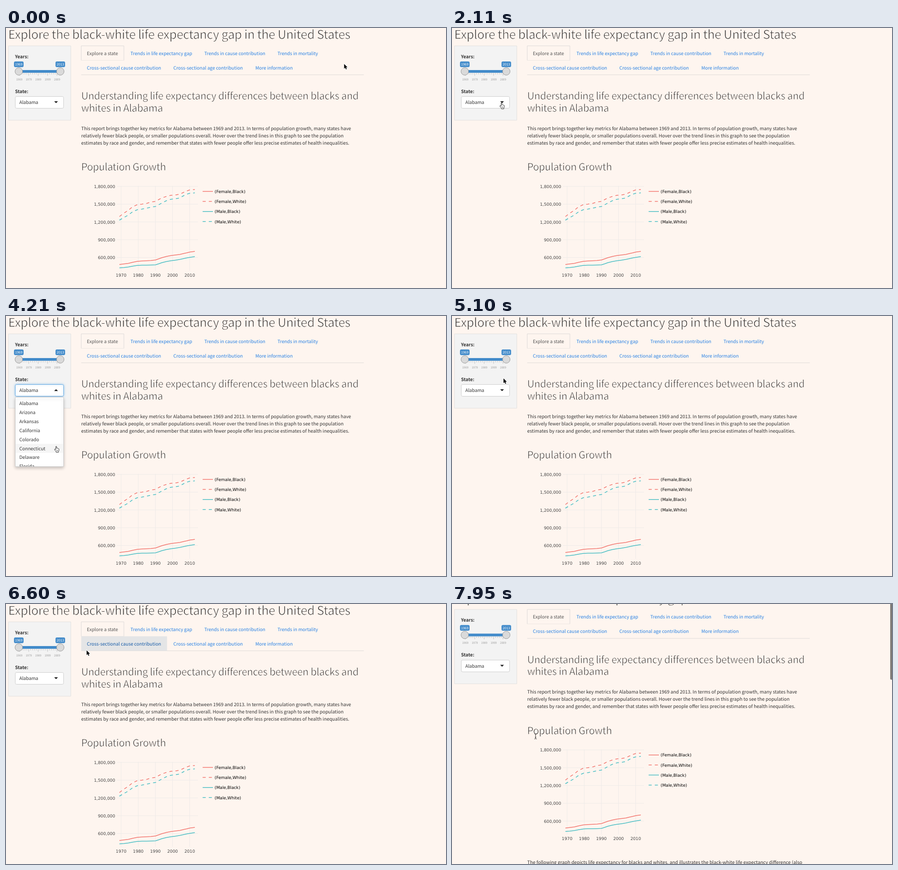
An HTML page with a canvas that plays this animation: 974x575 px, repeating every 8000 ms.

```html
<!DOCTYPE html>
<html lang="en">
<head>
<meta charset="utf-8">
<title>Life expectancy gap</title>
<style>
  html, body { margin: 0; width: 100%; height: 100%; overflow: hidden; background: #fef5ef; }
  canvas { display: block; }
</style>
</head>
<body>
<canvas id="stage" width="974" height="575"></canvas>
<script>
const ctx = document.getElementById('stage').getContext('2d');
const LOOP = 8000;
const BG = '#fef5ef', INK = '#333', LINK = '#2780e3', CORAL = '#f3746d', TEAL = '#45bdc3';
const SANS = '"Noto Sans CJK JP", "Noto Sans CJK SC", "Noto Sans CJK", "Open Sans", sans-serif';
const CHART_FONT = '9.2px "DejaVu Sans", sans-serif';
const LABEL = 10.2, PROSE = 10.3, TITLE = 26.73, SECTION = 21.92;

const OPEN = 2410, CLOSE = 4950, SCROLL = 7950;

// Pointer steps: time, x, y, shape. The picture holds between steps.
const pointer = [
  [0, 748.5, 79.5, arrow], [600, 690, 88, arrow], [750, 480, 112, arrow],
  [900, 260, 140, arrow], [1060, 140, 156, arrow], [1210, 113, 159, hand],
  [1960, 109, 162, hand], [2110, 105.5, 165, hand],
  [3760, 106, 190, hand], [3910, 107, 232, hand], [4060, 107, 272, hand],
  [4210, 107, 287.5, hand], [4360, 107.5, 268, hand], [4510, 108.5, 224, hand],
  [4660, 110, 178, hand], [4800, 112.5, 126, arrow], [4950, 113.5, 132, arrow],
  [5100, 114, 138, arrow], [5400, 104, 130, arrow], [5550, 82, 114, arrow],
  [5700, 60, 99, arrow], [5850, 46, 95, arrow], [6000, 43, 100, arrow],
  [6150, 44, 107, arrow], [6300, 46, 112, arrow], [6450, 105, 110, arrow],
  [6600, 178.5, 102.5, arrow], [6750, 186, 107, arrow], [6900, 191, 112, arrow],
  [7200, 191, 152, beam], [7350, 190, 212, beam], [7500, 187, 266, beam], [7650, 185, 292.5, beam]
];

// Chart curves share these x positions.
const xs = [251, 261, 271, 280, 291, 301, 311, 321, 331, 338, 345, 355, 365, 375, 385, 392, 400, 407, 418];
const series = [
  { name: '(Female,Black)', color: CORAL, dash: [],
    ys: [523, 521.8, 520.5, 518.2, 516, 515.2, 514.8, 514.2, 513, 510.5, 508, 505.2, 503.3, 502, 500.8, 499, 497.3, 495.6, 494] },
  { name: '(Female,White)', color: CORAL, dash: [6.8, 6.8],
    ys: [417, 409.5, 403, 395.5, 390.5, 389.5, 388, 384.8, 383.5, 379.5, 375.8, 372.5, 370, 369.2, 367.5, 364, 360.5, 358, 357.2] },
  { name: '(Male,Black)', color: TEAL, dash: [],
    ys: [530.5, 529.7, 528.6, 526.8, 525, 524.6, 524.4, 524.2, 523.8, 521.5, 519, 516.6, 514.8, 513.4, 511.8, 510.2, 508.6, 507.2, 505.6] },
  { name: '(Male,White)', color: TEAL, dash: [6.8, 6.8],
    ys: [425, 419, 413.5, 406.5, 401.7, 400.5, 398.5, 396.2, 394.7, 391, 387, 382, 378.8, 377.6, 375.8, 371.5, 367.5, 365.5, 364.6] }
];
const states = ['Alabama', 'Arizona', 'Arkansas', 'California', 'Colorado', 'Connecticut', 'Delaware', 'Florida'];

function text(str, x, y, color = INK, size = LABEL, weight = 400, align = 'left') {
  ctx.font = `${weight} ${size}px ${SANS}`;
  ctx.fillStyle = color;
  ctx.textAlign = align;
  ctx.fillText(str, x, y);
}

function hasLight() {
  const width = weight => {
    ctx.font = `${weight} 100px ${SANS}`;
    return ctx.measureText('Understanding').width;
  };
  return Math.abs(width(300) - width(400)) > 1;
}

// Without a light face, the regular one is set tighter and thinned at its edges.
function heading(str, x, y, size) {
  if (hasLight()) {
    text(str, x, y, INK, size, 300);
    return;
  }
  ctx.save();
  ctx.letterSpacing = `${-0.0155 * size}px`;
  text(str, x, y, INK, size);
  ctx.strokeStyle = BG;
  ctx.lineWidth = 0.035 * size;
  ctx.lineJoin = 'round';
  ctx.strokeText(str, x, y);
  ctx.restore();
}

function box(x, y, w, h, r, fill, stroke) {
  ctx.beginPath();
  ctx.roundRect(x, y, w, h, r);
  if (fill) { ctx.fillStyle = fill; ctx.fill(); }
  if (stroke) { ctx.strokeStyle = stroke; ctx.lineWidth = 1; ctx.stroke(); }
}

function line(points, color, width = 1, dash = []) {
  ctx.beginPath();
  points.forEach(([x, y]) => ctx.lineTo(x, y));
  ctx.strokeStyle = color;
  ctx.lineWidth = width;
  ctx.setLineDash(dash);
  ctx.stroke();
  ctx.setLineDash([]);
}

function shadowed(color, blur, dy, draw) {
  ctx.save();
  ctx.shadowColor = color;
  ctx.shadowBlur = blur;
  ctx.shadowOffsetY = dy;
  draw();
  ctx.restore();
}

function drawSlider() {
  text('Years:', 20, 66.6, INK, LABEL, 700);
  for (let i = 0; i <= 22; i++) {
    const x = 29.5 + i * 4.17;
    line([[x, 99.5], [x, i % 5 ? 102.5 : 105.5]], '#aaa', 0.75);
  }
  for (let i = 0; i < 5; i++) text(1969 + i * 10, 29.5 + i * 20.9, 115.5, '#999', 6.1, 400, 'center');
  box(28, 93, 92, 6, 0, '#428bca');
  [[28.3, 1969], [120.2, 2013]].forEach(([x, year]) => {
    box(x - 10.6, 74, 21.2, 12.6, 3, '#428bca');
    text(year, x, 83, '#fff', 7.45, 400, 'center');
    box(x - 8.3, 87.7, 16.6, 16.6, 8.3, '#dadada', '#999');
  });
}

function drawSelect(open) {
  text('State:', 20, 143.8, INK, LABEL, 700);
  const frame = () => box(20.5, 151.5, 107, 26, 3, '#fff', open ? '#62a8e2' : '#ccc');
  if (open) shadowed('rgba(102,175,233,.6)', 5, 0, frame);
  else frame();
  text('Alabama', 29.5, 168);
  const [base, tip] = open ? [166, 161.8] : [162, 166.3];
  ctx.beginPath();
  ctx.moveTo(106.7, base);
  ctx.lineTo(115, base);
  ctx.lineTo(110.8, tip);
  ctx.fillStyle = '#222';
  ctx.fill();
}

function drawSidebar(open) {
  box(5.5, 39.5, 138, 164.5, 0, '#f3f3f3', '#e3e1df');
  drawSlider();
  drawSelect(open);
}

function drawMenu(active) {
  shadowed('rgba(0,0,0,.22)', 7, 3, () => box(20.5, 179.5, 107, 153.5, 2, '#fff', '#ccc'));
  ctx.save();
  ctx.beginPath();
  ctx.rect(21, 180, 106, 152.5);
  ctx.clip();
  states.forEach((name, i) => {
    const mid = 193.4 + i * 19.85;
    if (i === active) box(21, mid - 10, 106, 19.85, 0, '#f5f5f5');
    text(name, 29.5, mid + 3.9);
  });
  ctx.restore();
}

function drawTabs(hover) {
  line([[166.5, 103.5], [792, 103.5]], '#dedad8');
  line([[166.5, 71.5], [166.5, 39.5], [261, 39.5], [261, 71.5]], '#dcd9d7');
  line([[166.5, 71.5], [261, 71.5]], '#ece6e2');
  if (hover) box(166.5, 71.5, 190, 31.8, 0, '#e4e5e6');
  text('Explore a state', 179, 59.7, '#555');
  text('Trends in life expectancy gap', 275.5, 59.7, LINK);
  text('Trends in cause contribution', 439, 59.7, LINK);
  text('Trends in mortality', 601, 59.7, LINK);
  text('Cross-sectional cause contribution', 179, 91.8, hover ? '#165ba8' : LINK);
  text('Cross-sectional age contribution', 370.5, 91.8, LINK);
  text('More information', 552, 91.8, LINK);
}

function drawReport() {
  heading('Understanding life expectancy differences between blacks and', 166.5, 158, SECTION);
  heading('whites in Alabama', 166.5, 184.8, SECTION);
  const prose = (str, y) => text(str, 166.5, y, INK, PROSE);
  [
    'This report brings together key metrics for Alabama between 1969 and 2013. In terms of population growth, many states have',
    'relatively fewer black people, or smaller populations overall. Hover over the trend lines in this graph to see the population',
    'estimates by race and gender, and remember that states with fewer people offer less precise estimates of health inequalities.'
  ].forEach((row, i) => prose(row, 225.7 + i * 16.1));
  heading('Population Growth', 166.5, 315.2, SECTION);
  prose('The following graph depicts life expectancy for blacks and whites, and illustrates the black-white life expectancy difference (also',
    602.8);
}

function drawChart() {
  const label = (str, x, y, align, color = '#444') => {
    ctx.font = CHART_FONT;
    ctx.fillStyle = color;
    ctx.textAlign = align;
    ctx.fillText(str, x, y);
  };
  for (let i = 0; i < 5; i++) {
    const x = 254.8 + i * 37.95, y = 350.3 + i * 39.3;
    line([[x, 349], [x, 537]], '#eeebe8');
    line([[245, y], [425, y]], '#eeebe8');
    label(1970 + i * 10, x, 549.6, 'center');
    label((1800000 - i * 300000).toLocaleString('en-US'), 241.5, y + 3.6, 'right');
  }
  series.forEach((s, i) => {
    line(xs.map((x, k) => [x, s.ys[k]]), s.color, 1.5, s.dash);
    const y = 361.4 + i * 22.2;
    line([[435.3, y], [458, y]], s.color, 1.5, s.dash);
    label(s.name, 461.8, y + 3.5, 'left', '#000');
  });
}

function arrow() {
  const p = new Path2D('M0 0V10.4L2.4 8.2L4 12L5.8 11.3L4.2 7.6L7.4 7.4Z');
  ctx.strokeStyle = '#fff';
  ctx.lineWidth = 1.6;
  ctx.stroke(p);
  ctx.fillStyle = '#000';
  ctx.fill(p);
}

function hand() {
  const p = new Path2D('M3.2 8V1.3Q4.2 0 5.2 1.3V4.8Q6.3 4 7 5.2Q8.2 4.5 8.7 5.7Q10 5.3 10.2 6.8V9.5' +
    'Q10 11 9.2 12V13.8H4Q3.8 12 2.4 10.6L.5 8.2Q-.1 6.8 1.3 6.7Q2.4 6.9 3.2 8Z');
  ctx.fillStyle = '#fff';
  ctx.fill(p);
  ctx.strokeStyle = '#111';
  ctx.lineWidth = 0.9;
  ctx.stroke(p);
  line([[5.3, 9], [5.3, 11.6]], '#111', 0.7);
  line([[7.2, 9], [7.2, 11.6]], '#111', 0.7);
}

function beam() {
  const p = new Path2D('M-2.5 -5.5Q-.4 -5.5 0 -4.3Q.4 -5.5 2.5 -5.5M0 -4.3V4.8M-2.5 6Q-.4 6 0 4.8Q.4 6 2.5 6M-1.4 2.6H1.4');
  ctx.strokeStyle = '#222';
  ctx.lineWidth = 1;
  ctx.stroke(p);
}

function activeRow(t, y) {
  if (t < 3910) return 0;
  return Math.max(0, Math.min(5, Math.floor((y - 183.4) / 19.85)));
}

function draw(t) {
  const [, px, py, shape] = pointer.findLast(step => step[0] <= t);
  const open = t >= OPEN && t < CLOSE;
  const scrolled = t >= SCROLL;

  ctx.textRendering = 'geometricPrecision';
  ctx.fillStyle = BG;
  ctx.fillRect(0, 0, 974, 575);

  ctx.save();
  if (scrolled) ctx.translate(0, -27.5);
  heading('Explore the black-white life expectancy gap in the United States', 5, 24.4, TITLE);
  drawSidebar(open);
  drawTabs(t >= 6600 && t < 6750);
  drawReport();
  drawChart();
  if (open) {
    drawMenu(activeRow(t, py));
    const blink = Math.floor((t - OPEN) / 450) % 2 === 1;
    if (blink && t < 4660) line([[72.5, 157], [72.5, 172]], INK);
  }
  ctx.restore();

  if (scrolled) box(970, -6, 8, 173.5, 3, '#7f7b78');

  ctx.save();
  ctx.translate(px, py);
  shape();
  ctx.restore();
}

const start = performance.now();
function tick() {
  draw((performance.now() - start) % LOOP);
  requestAnimationFrame(tick);
}
tick();
</script>
</body>
</html>
```
